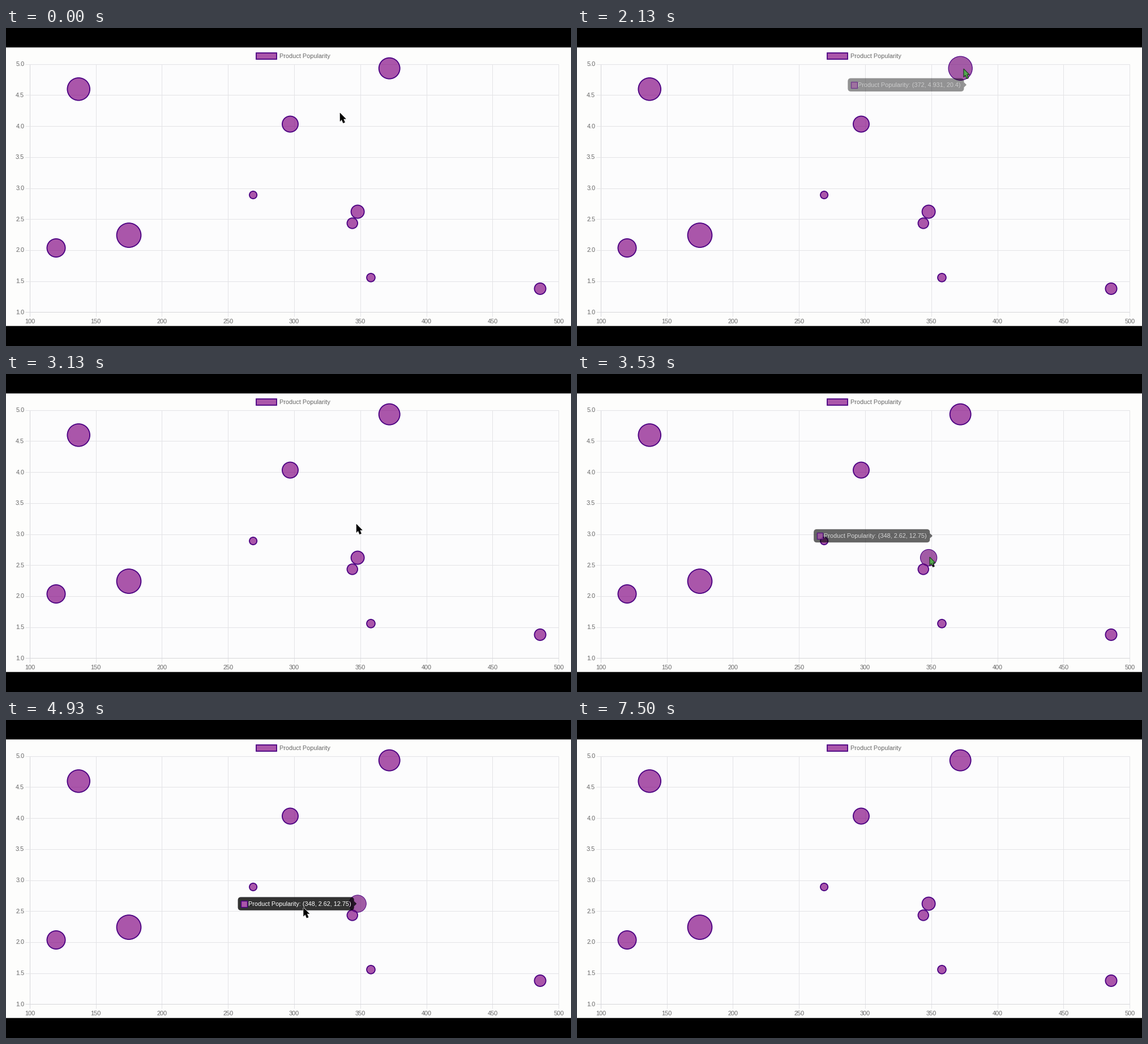
A matplotlib script that plays this animation: 998x561 px, repeating every 7.53 s.

```python
import numpy as np
import matplotlib.pyplot as plt
from matplotlib.animation import FuncAnimation
from matplotlib.patches import Circle, FancyBboxPatch, Polygon, Rectangle

W, H = 998, 561
STEP, FRAMES = 30, 251
K = 0.907  # screen pixels per chart unit
LAG = 60   # ms before the chart reacts to the pointer

INDIGO = "#4b0082"
FILL = np.array([128, 0, 128]) / 255
FILL_HOVER = np.array([112, 10, 118]) / 255
LABEL = "Product Popularity"

plt.rcParams["font.family"] = "Liberation Sans"

# Chart data: x, y, radius
DATA = [
    (120, 2.036, 17.75), (137, 4.596, 21.9), (175, 2.241, 23.65),
    (269, 2.89, 7.3), (297, 4.032, 15.5), (344, 2.434, 10.25),
    (348, 2.62, 12.75), (358, 1.558, 8.15), (372, 4.931, 20.4),
    (486, 1.379, 11.1),
]

# Pointer moves: start ms, end ms, tip position at the end
HOME = (590, 150)
MOVES = [
    (150, 560, (508, 168)), (1590, 2064, (683, 72)),
    (2680, 3120, (619, 265)), (3120, 3363, (623, 323)),
    (4830, 5110, (223, 358)), (5110, 5420, (222, 385)),
    (6050, 6940, (505, 168)), (6960, 7300, HOME),
]
POINTER_GONE = 7440


def px(v):
    return 41.8 + (v - 100) * 934.4 / 400


def py(v):
    return 501.4 - (v - 1) * 437.8 / 4


def linear(ms):
    return float(np.clip(ms / 200, 0, 1))


def ease_out(ms):
    return 1 - (1 - float(np.clip(ms / 400, 0, 1))) ** 4


def level(t, start, end, ramp):
    return ramp(min(t, end) - start) * (1 - ramp(t - end))


def pointer_at(t):
    tip = np.array(HOME, float)
    for start, end, goal in MOVES:
        u = np.clip((t - start) / (end - start), 0, 1)
        tip += (goal - tip) * u * u * (3 - 2 * u)
    return tip


def find_hovers():
    """Follow the pointer and list (start, end, bubble) for each visit."""
    visits, current, since = [], None, 0
    for t in range(0, STEP * FRAMES, 5):
        x, y = pointer_at(t - LAG)
        hit = None
        for i, (bx, by, r) in enumerate(DATA):
            reach = (r + 4 * (i == current)) * K
            if np.hypot(x - px(bx), y - py(by)) < reach:
                hit = i
        if hit != current:
            if current is not None:
                visits.append((since, t, current))
            current, since = hit, t
    return visits


def arrow_shape():
    """Half an arrow along its axis, mirrored and tilted."""
    half = np.array([(13.5, 5.5), (11.6, 1.6), (18.4, 1.6)])
    along, across = np.vstack([[(0, 0)], half, half[::-1] * (1, -1)]).T
    c, s = np.cos(np.pi / 8), np.sin(np.pi / 8)
    return np.column_stack([along * s - across * c, along * c + across * s])


HOVERS = find_hovers()
ARROW = arrow_shape()

fig = plt.figure(figsize=(W / 72, H / 72), dpi=72, facecolor="black")
ax = fig.add_axes([0, 0, 1, 1])
ax.set_xlim(0, W)
ax.set_ylim(H, 0)
ax.axis("off")


def put(patch, z):
    patch.set_zorder(z)
    return ax.add_patch(patch)


def write(x, y, s, color="#666666", ha="left", z=2):
    return ax.text(x, y + 3.9, s, size=12 * K, color=color, ha=ha,
                   va="baseline", zorder=z)


def rule(xs, ys, first):
    ax.plot(xs, ys, color="#d6d6da" if first else "#e3e3e6", lw=1, zorder=1,
            solid_capstyle="butt")


# Chart area, grid and labels
put(Rectangle((0, 34.3), W, 491.4, fc="#fdfdfc", lw=0, snap=False), 0)
put(Rectangle((41, 63), 935, 438, fc="#fcfcfd", lw=0), 0.5)
for v in range(100, 501, 50):
    rule([px(v)] * 2, [63.5, 509], v == 100)
    write(px(v), 517.3, str(v), ha="center")
for v in np.arange(1, 5.1, 0.5):
    rule([34.5, 976], [py(v)] * 2, v == 1)
    write(32.3, py(v) - 0.4, f"{v:.1f}", ha="right")

put(Rectangle((442.2, 43.6), 36.2, 10.9, fc=(*FILL, 0.66), ec=INDIGO,
              lw=2 * K, joinstyle="miter"), 2)
write(483.4, 48.6, LABEL)

bubbles = [put(Circle((px(x), py(y)), r * K, ec=INDIGO), 3)
           for x, y, r in DATA]

# Tooltip
box = put(FancyBboxPatch((0, 0), 200, 23.4, fc="black", lw=0,
                         boxstyle=f"round,pad=0,rounding_size={6 * K}"), 5)
caret = put(Polygon([(0, 0), (1, 0), (0, 1)], fc="black", lw=0), 5)
swatch = put(Rectangle((0, 0), 12 * K, 12 * K, fc="#aa56aa", ec=INDIGO,
                       lw=1.4, joinstyle="miter"), 6)
tip_text = write(0, 0, "", "white", z=6)

# Pointer: black arrow, green over a bubble, light rim over the tooltip
rim = put(Polygon(ARROW, fc="white", ec="white", lw=2), 7)
arrow = put(Polygon(ARROW, fc="black", ec="black", lw=0.5), 8)
glow = put(Polygon(ARROW, fc="#55a850", ec="#1c3a1c", lw=1), 9)
rim.set_clip_path(box)


def caption(i):
    x, y, r = DATA[i]
    return f"{LABEL}: ({x}, {y:g}, {r:g})"


def layout(i):
    """Left edge, middle and width of the tooltip at rest."""
    tip_text.set_text(caption(i))
    w = tip_text.get_window_extent(fig.canvas.get_renderer()).width + 26 * K
    x, y = bubbles[i].center
    left = x + 7 * K if x <= px(300) else x - 7 * K - w
    return np.array([left, y, w])


PLACES = {i: layout(i) for _, _, i in HOVERS}


def draw_tooltip(t):
    n = max([k for k, h in enumerate(HOVERS) if h[0] <= t], default=0)
    start, end, i = HOVERS[n]
    alpha = level(t, start, end, linear)
    for part in (box, caret, swatch, tip_text, rim):
        part.set_visible(alpha > 0)
    if alpha == 0:
        return
    goal, last = PLACES[i], PLACES[HOVERS[n - 1][2]]
    left, mid, w = last + (goal - last) * ease_out(t - start)
    box.set_bounds(left, mid - 11.7, w, 23.4)
    on_right = goal[0] > bubbles[i].center[0]
    edge, reach = (left, -5 * K) if on_right else (left + w, 5 * K)
    caret.set_xy([(edge, mid - 5 * K), (edge + reach, mid),
                  (edge, mid + 5 * K)])
    swatch.set_xy((left + 6 * K, mid - 6 * K))
    tip_text.set_position((left + 20 * K, mid + 3.9))
    tip_text.set_text(caption(i))
    for part, strength in ((box, 0.8), (caret, 0.8), (swatch, 1),
                           (tip_text, 1)):
        part.set_alpha(strength * alpha)


def draw_bubbles(t):
    for i, (bubble, (_, _, r)) in enumerate(zip(bubbles, DATA)):
        hot = max([level(t, s, e, ease_out) for s, e, k in HOVERS if k == i],
                  default=0)
        bubble.set_radius((r + 4 * hot) * K)
        bubble.set_facecolor((*(FILL + (FILL_HOVER - FILL) * hot), 0.66))
        bubble.set_linewidth((2 - hot) * K)
        bubble.set_zorder(4 if hot > 0 else 3)


def draw_pointer(t):
    tip = pointer_at(t)
    seen = t < POINTER_GONE
    for part in (rim, arrow, glow):
        part.set_xy(ARROW + tip)
    arrow.set_visible(seen)
    rim.set_visible(seen and rim.get_visible())
    under = [b for b in bubbles if np.hypot(*(tip - b.center)) < b.radius]
    glow.set_visible(seen and bool(under))
    if under:
        glow.set_clip_path(under[0])


def draw(n):
    t = n * STEP
    draw_bubbles(t)
    draw_tooltip(t)
    draw_pointer(t)
    return []


anim = FuncAnimation(fig, draw, frames=FRAMES, interval=STEP,
                     repeat=True, repeat_delay=0, blit=False)
plt.show()
```
